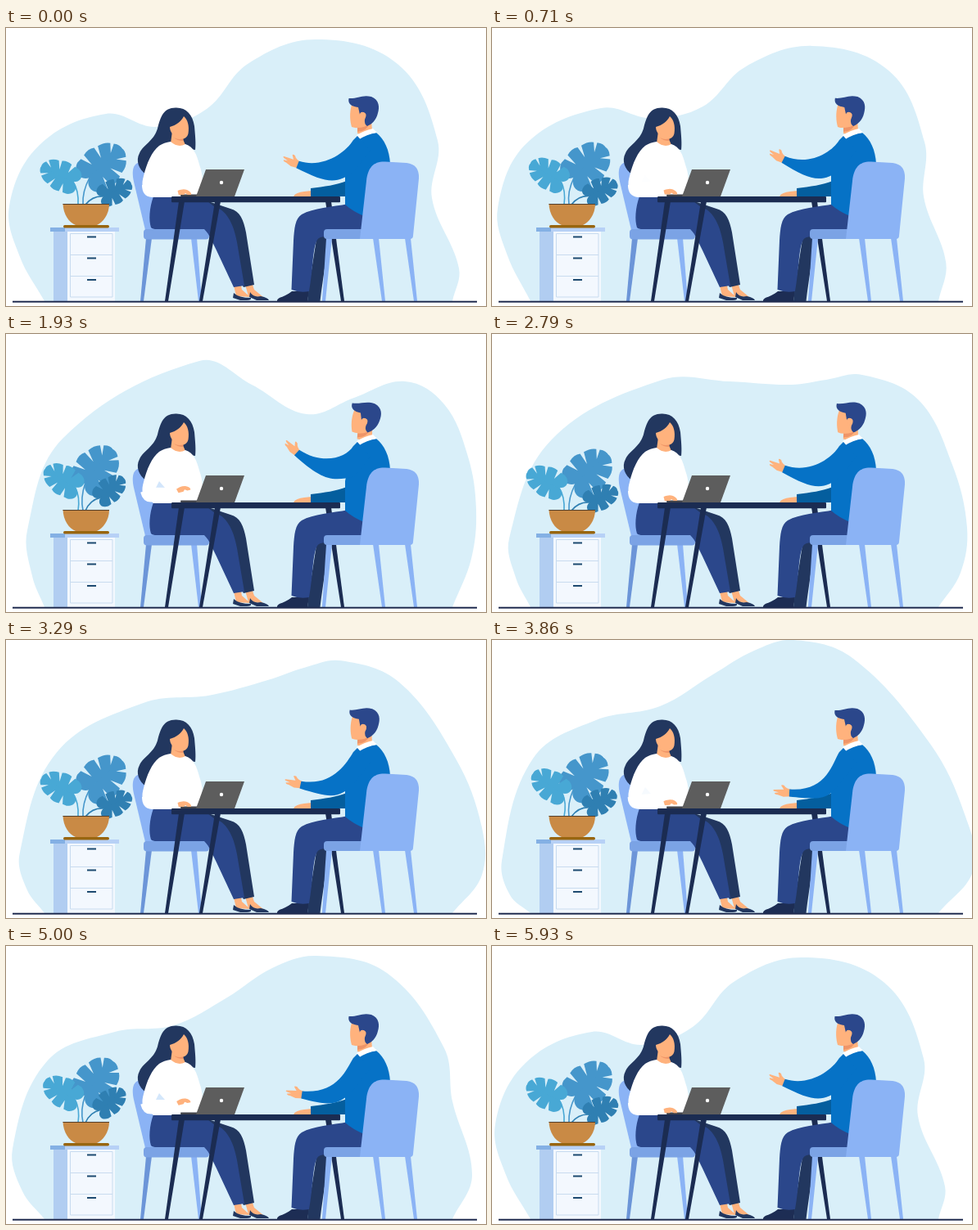
An HTML page with a canvas that plays this animation: 586 px wide and 340 px high, repeating every 6.07 s.

```html
<!DOCTYPE html>
<html lang="en">
<head>
<meta charset="utf-8">
<title>Interview at a desk</title>
<style>
html, body { margin: 0; width: 100%; height: 100%; overflow: hidden; background: #fff; }
canvas { display: block; width: 586px; height: 340px; }
</style>
</head>
<body>
<canvas id="stage" width="586" height="340"></canvas>
<script>
const ctx = document.getElementById('stage').getContext('2d');
const LOOP = 6070, TICK = 1000 / 14, CYCLE = 42;
const C = {
  sky: '#d9eff9', navy: '#22375f', blue: '#2b478b', table: '#1b2c52', skin: '#ffb27d',
  shade: '#ef9568', chair: '#8bb3f5', seat: '#7ba3e5', sweater: '#0672c6', sleeve: '#045e9e'
};

// Poses of the slow motion; each row belongs to one tick in poseTicks.
const poseTicks = [3, 16, 27, 39, 54, 70, 83];
const loopRows = rows => [...rows, rows[0]];
const blobRows = loopRows([
  [17,280, 4,218, 41,143, 122,105, 183,121, 245,99, 295,44, 378,14, 478,44, 527,138, 520,208, 553,294],
  [22,275, 14,225, 48,136, 163,79, 228,89, 290,92, 345,57, 422,38, 500,68, 535,145, 544,208, 558,276],
  [32,296, 26,240, 70,127, 236,33, 300,62, 367,98, 425,78, 487,58, 535,86, 564,150, 574,215, 568,275],
  [29,298, 21,250, 72,130, 208,56, 290,58, 365,62, 408,56, 452,50, 520,80, 562,160, 580,237, 572,292],
  [22,312, 12,270, 50,145, 127,98, 205,81, 270,42, 320,13, 368,0, 440,22, 535,127, 577,213, 588,280],
  [20,300, 8,248, 50,141, 133,105, 205,97, 270,63, 325,27, 379,12, 465,33, 535,125, 545,190, 569,280]
]);
// wrist x, y, inner elbow x, y, outer elbow x, y, hand angle
const armRows = loopRows([
  [356,167, 388,172, 392,190, 22],
  [355,150, 386,164, 386,183, 36],
  [355,145, 386,160, 386,179, 42],
  [356,165, 388,171, 392,190, 23],
  [363,187, 408,186, 398,195, 3],
  [361,182, 404,181, 394,195, 8]
]);
const headRows = [0, 2, 6, 3.5, 0, 0, 0].map(a => [a]);

// Poses of the short cycle: left leaf, big leaf, dark leaf angle, big leaf shift, typing lift
const cycleTicks = [3, 12, 16, 27.5, 39, 42];
const cycleRows = [
  [0, 0, 0, 0, 0], [8, -4.5, -3.5, 0, .2], [15, -15, -11, 8, 1],
  [5, -9, -16, 0, 1], [0, 0, 0, 0, 0], [0, 0, 0, 0, 0]
];

function pose(ticks, rows, t) {
  const last = ticks.length - 1;
  if (t <= ticks[0]) return rows[0];
  if (t >= ticks[last]) return rows[last];
  const i = ticks.findIndex(k => k > t) - 1;
  const span = ticks[i + 1] - ticks[i], u = (t - ticks[i]) / span;
  const slope = (k, j) => k === 0 || k === last ? 0
    : (rows[k + 1][j] - rows[k - 1][j]) / (ticks[k + 1] - ticks[k - 1]);
  const ease = u * u * (3 - 2 * u);
  return rows[i].map((a, j) => a + (rows[i + 1][j] - a) * ease + span * u * (1 - u) *
    ((1 - u) * slope(i, j) - u * slope(i + 1, j)));
}

function fill(color, d) {
  ctx.fillStyle = color;
  ctx.fill(new Path2D(d));
}
function line(color, width, d) {
  ctx.strokeStyle = color;
  ctx.lineWidth = width;
  ctx.stroke(new Path2D(d));
}
function rect(color, x, y, w, h, r = 0) {
  ctx.fillStyle = color;
  ctx.beginPath();
  ctx.roundRect(x, y, w, h, r);
  ctx.fill();
}
function turned(x, y, degrees, draw) {
  ctx.save();
  ctx.translate(x, y);
  ctx.rotate(degrees * Math.PI / 180);
  draw();
  ctx.restore();
}
function pivot(x, y, degrees, draw) {
  turned(x, y, degrees, () => { ctx.translate(-x, -y); draw(); });
}
// Tapered furniture leg
function leg(color, top, y, foot, w = 7) {
  fill(color, `M${top} ${y}h${w}L${foot + 4} 334h-4Z`);
}

function drawBlob(row) {
  const pts = [[47, 334]];
  for (let i = 0; i < row.length; i += 2) pts.push([row[i], row[i + 1]]);
  pts.push([545, 334]);
  const dirs = pts.map((p, i) => {
    const a = pts[i - 1] || p, b = pts[i + 1] || p;
    const d = Math.hypot(b[0] - a[0], b[1] - a[1]);
    return [(b[0] - a[0]) / d, (b[1] - a[1]) / d];
  });
  ctx.beginPath();
  ctx.moveTo(...pts[0]);
  for (let i = 1; i < pts.length; i++) {
    const [a, b, da, db] = [pts[i - 1], pts[i], dirs[i - 1], dirs[i]];
    const k = .36 * Math.hypot(b[0] - a[0], b[1] - a[1]);
    ctx.bezierCurveTo(a[0] + da[0] * k, a[1] + da[1] * k, b[0] - db[0] * k, b[1] - db[1] * k, ...b);
  }
  ctx.fillStyle = C.sky;
  ctx.fill();
}

function drawCabinet() {
  rect('#b1cdf1', 58, 249, 17, 85);
  rect('#f3f8fe', 75, 249, 58, 85);
  rect('#b7d1f6', 54, 244, 84, 5);
  rect('#84b0e4', 54, 244, 18, 5);
  line('#c8dbef', 1, 'M78.5 251.5H130V329H78.5ZM78.5 277.5H130M78.5 303.5H130');
  line('#1d4a70', 1.8, 'M99 255.5h11M99 281.5h11M99 308h11');
}

const halfLeaf = 'M0 0C-.2 -.08 -.22 -.36 .02 -.47L.14 -.48L.24 -.2L.25 -.5Q.42 -.56 .54 -.47' +
  'L.5 -.17L.63 -.44Q.8 -.41 .89 -.29L.74 -.1L.94 -.22Q1.04 -.1 1 .02L0 .02Z';

function drawLeaf(color, base, bend, tip, angle, length, width, sway, shift = 0) {
  ctx.save();
  ctx.translate(shift, 0);
  pivot(base, 216, sway, () => {
    line(color, 1.6, `M${base - shift} 216Q${bend} ${tip[0]} ${tip[1]}`);
    turned(tip[0], tip[1], angle, () => {
      for (const side of [1, -1]) {
        ctx.save();
        ctx.scale(length, width * side);
        fill(color, halfLeaf);
        ctx.restore();
      }
    });
  });
  ctx.restore();
}

function drawPlant([left, big, dark, shift]) {
  drawLeaf('#4596cb', 94, '93 200', [102, 183], -42, 53, 50, big, shift);
  drawLeaf('#48a8d5', 88, '89 199', [82, 188], 206, 43, 36, left);
  drawLeaf('#2f7fb2', 97, '106 205', [119, 206], -24, 37, 30, dark);
  fill('#c98a45', 'M69.5 215H126C126 228 118 238 111 241H85C77 238 70 228 69.5 215Z');
  line('#54402c', 1, 'M69.5 215.5H126');
  rect('#98650f', 70, 241, 56, 3.5, 1.7);
}

function drawWoman(lift) {
  fill(C.chair, 'M170 247L156 188C153 174 155 164 166 164L186 164L196 247Z');
  leg('#6c95d8', 171, 257, 164);
  leg(C.chair, 226, 257, 235);
  rect(C.seat, 168, 246, 80, 12.5, 4);

  // Feet and trousers
  fill(C.skin, 'M278 315H287L288 320L298 329L281 328ZM292 314H301L303 320L314 329L296 328Z');
  fill(C.navy, 'M278 324Q284 330 299 330Q300 333 294 333H286L277 330ZM298 323Q302 330 311 328Q320 330 321 333H306L297 329Z');
  fill(C.navy, 'M235 208L274 221C286 224 290 235 293 250L303 314L290 317L250 240Z');
  fill(C.blue, 'M180 206C175 220 174 235 177 244Q179 246 184 246H242C249 253 252 262 257 272L278 317L291 315L282 262C278 238 268 222 255 219L238 206Z');

  // Hair, face and neck
  fill(C.navy, 'M207 97.500C220 97 228 106 230 120C231 132 232 141 231 149C222 148 216 145 212 140L190 158L171 179C162 173 158 162 163 153C168 142 180 139 185 123C189 108 192 98 207 97.500Z');
  fill(C.skin, 'M203 126H216V136L219 143Q210 147 201 141Z');
  fill(C.shade, 'M205 134Q212 138 217 134L216 138Q209 138 205 134Z');
  fill(C.skin, 'M217 108C222 112 224 120 222.500 129C221 136 214 137 209 134C203 131 200 126 200 121C208 119 214 114 217 108Z');

  // Blouse and typing arm
  fill('#fff', 'M201 139Q210 147 219 142C229 145 233 155 236 167C240 178 242 190 236 207H180L174 201C166 199 165 191 168 181C172 165 178 151 187 144Q193 140 201 139Z');
  if (lift > 0) {
    ctx.globalAlpha = Math.min(1, lift);
    fill('#d3e6fb', 'M187 180L182.500 189L194 188Z');
    ctx.globalAlpha = 1;
  }
  rect('#43454c', 213, 203.5, 24, 2.5, 1);
  pivot(172, 200, -14 * lift, () => {
    fill(C.skin, 'M207 200Q215 196 221 198Q227 201 226 204H222L219 202L217 204H209Z');
    fill('#fff', 'M166 192Q166 206 178 207L211 205L209 197L182 190Z');
  });
}

function drawTable() {
  leg(C.table, 211, 212, 194);
  leg(C.table, 255, 212, 236);
  leg(C.table, 390, 212, 409);
}

function drawTableTop() {
  rect(C.table, 202, 206, 206, 7.2, 1);
  fill('#5d5d5d', 'M244 173H291L279 206H232Z');
  ctx.fillStyle = '#fff';
  ctx.beginPath();
  ctx.arc(263, 189, 2.2, 0, 7);
  ctx.fill();
}

function drawArm([wx, wy, ix, iy, ox, oy, angle]) {
  turned(wx, wy, angle, () => fill(C.skin,
    'M3 -4C-2 -5 -5 -6 -7 -9Q-11 -10 -10 -8L-7 -4L-19 -3Q-21 -2 -18 -1L-13 0L-18 1Q-18 3 -14 3L-7 5L3 4Z'));
  const a = angle * Math.PI / 180, nx = Math.sin(a) * 4.5, ny = Math.cos(a) * 4.5;
  ctx.fillStyle = C.sweater;
  ctx.beginPath();
  ctx.moveTo(429, 132);
  ctx.lineTo(424, 137);
  ctx.bezierCurveTo(415, 152, ix, iy, wx + nx, wy - ny);
  ctx.lineTo(wx - nx, wy + ny);
  ctx.bezierCurveTo(ox, oy, ox + 12, oy + 2, 426, 174);
  ctx.lineTo(445, 150);
  ctx.fill();
}

function drawMan(arm, headAngle) {
  // Trousers and shoes
  fill('#1d2d54', 'M331 333C332 329 341 329 349 322H370L368 334H331Z');
  fill(C.navy, 'M380 252H393C392 280 387 305 383.500 334H368L370 315Z');
  fill(C.blue, 'M418 215C398 219 375 220 361 228C353 233 352 245 351 260L348.500 320Q358 324 370 322C375 295 374 270 380 259Q382 255 392 255H440V225Z');

  // Far arm, sweater and collar
  fill(C.skin, 'M351 205.500Q354 201 364 200L373 199V206H352Z');
  fill(C.sleeve, 'M372 196C389 194 403 192 416 187V206H372Z');
  fill(C.sweater, 'M429 132L452 128C462 136 468 149 469 166L437 230Q423 224 414 216V180L420 150Z');

  pivot(436, 125, headAngle, () => {
    fill(C.skin, 'M429 116L446 113L447 125Q437 131 429 129Z');
    fill(C.shade, 'M429 122Q439 122 443 117Q441 126 429 127Z');
    fill(C.skin, 'M422 94C419 104 420 114 422 121Q430 124 437 119L442 113L441 96Z');
    fill(C.blue, 'M418.500 86C428 87 435 81 446 84C456 88 456 97 454 104C452 113 446 118 441 120Q437 117 438 112Q442 104 436 103Q433 103 432 106L430 97C422 96 417 93 418.500 86Z');
    fill(C.skin, 'M432 105Q434 101 438 104Q440 109 436 112Q432 112 432 105Z');
  });
  fill('#fff', 'M428 131Q438 125 448 123L453 128Q440 130 430 137Z');
  drawArm(arm);

  // Chair
  leg(C.chair, 391, 257, 386);
  leg(C.chair, 448, 257, 459);
  leg(C.chair, 487, 257, 498);
  rect(C.seat, 388, 246, 65, 12, 4);
  fill(C.chair, 'M432 258L440 187C442 170 449 163 463 163.500L489 165Q505 167 504 184L497 254Q497 258 493 258Z');
}

function render(ms) {
  const tick = Math.floor((ms % LOOP + 3) / TICK);
  const cycle = pose(cycleTicks, cycleRows, tick % CYCLE);
  const slow = rows => pose(poseTicks, rows, tick);
  ctx.fillStyle = '#fff';
  ctx.fillRect(0, 0, 586, 340);
  drawBlob(slow(blobRows));
  drawCabinet();
  drawPlant(cycle);
  drawWoman(cycle[4]);
  drawTable();
  drawMan(slow(armRows), slow(headRows)[0]);
  drawTableTop();
  line('#202c50', 2, 'M8 334.700H575');
}

let start;
function loop(now) {
  start ??= now;
  render(now - start);
  requestAnimationFrame(loop);
}
render(0);
requestAnimationFrame(loop);
</script>
</body>
</html>
```
